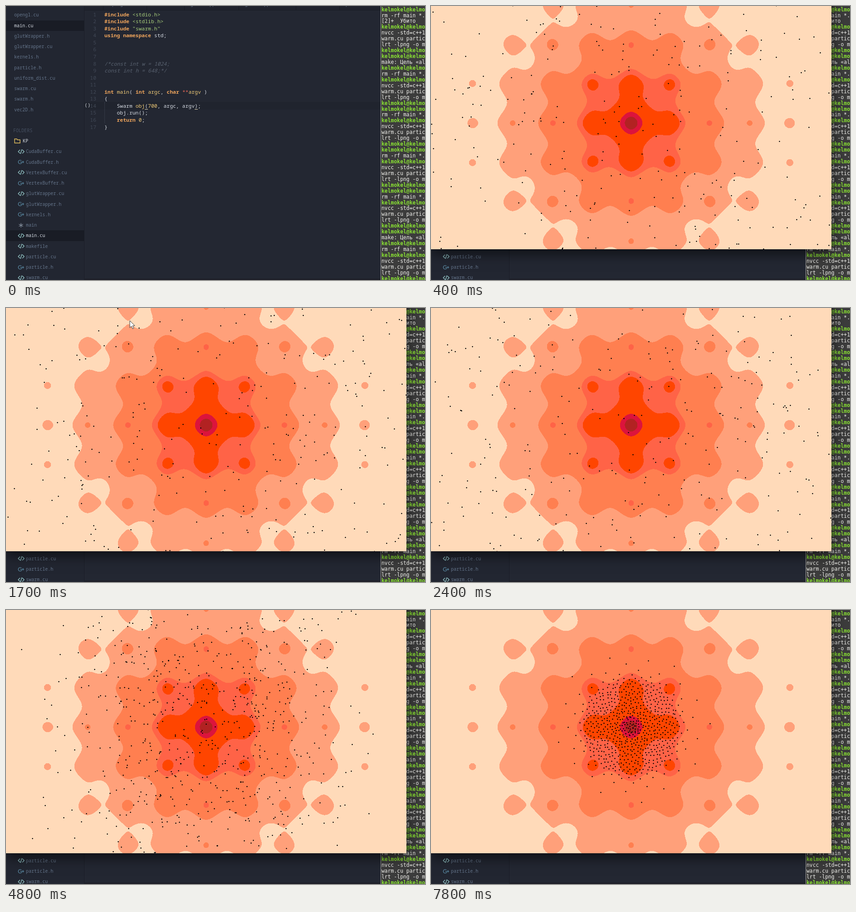
These frames come from a looping animation (924x606 px, 8000 ms). An HTML page with a canvas:

```html
<!DOCTYPE html>
<html lang="en">
<head>
<meta charset="utf-8">
<title>Particle swarm</title>
<style>
html, body { margin: 0; width: 100%; height: 100%; overflow: hidden; background: #232732; }
#stage { position: relative; width: 924px; height: 606px; overflow: hidden; background: #232732; }
#stage div, #stage svg, #stage canvas, #stage pre { position: absolute; margin: 0; white-space: pre; }
#side { left: 0; top: 0; width: 172px; height: 606px; background: #222631; border-right: 1px solid #1b1e27;
  overflow: hidden; font: 10.05px/23.25px "Roboto Mono", "Noto Sans Mono", monospace; color: #64748a; }
#side .row { left: 0; width: 172px; height: 23.25px; }
#side .on { background: #191c25; color: #d5dae2; }
#tabs { left: 173px; top: 0; width: 653px; height: 9px; background: #20232d; border-bottom: 1px solid #1b1e27;
  overflow: hidden; font: 10px/14px "Noto Sans Mono", monospace; color: #64748a; }
#tabs div { top: -12px; height: 22px; border-left: 1px solid #181b23; padding-left: 13px; }
#code, #nums { top: 10.6px; font: 11.45px/15.56px "Roboto Mono", "Noto Sans Mono", monospace; }
#code { left: 217px; color: #d5dae2; }
#nums { left: 173px; width: 26px; text-align: right; color: #414856; }
#code b { color: #eea45c; }
#code .g { color: #a9cf7b; }
#code .y { color: #f0cb78; }
#code .r { color: #ec6a58; }
#code i { color: #596270; }
#code u { text-decoration: none; box-shadow: 0 1px #e8dcb8; }
#term { left: 826px; top: 0; width: 97px; height: 606px; background: #3c3c3c; border-left: 1px solid #9b9b9b; overflow: hidden; }
#term pre { left: 1px; top: 1.6px; font: 11.4px/12.93px "DejaVu Sans Mono", monospace; color: #f4f4f0; }
#term b { color: #8ae234; }
</style>
</head>
<body>
<div id="stage">
  <div id="side"></div>
  <div id="tabs"></div>
  <div style="left:173px;top:212px;width:653px;height:17px;background:#20242e"></div>
  <div style="left:217px;top:213px;height:46px;border-left:1px dotted #454b58"></div>
  <pre id="nums"></pre>
  <div style="left:173px;top:211px;font:11.45px/16px 'Noto Sans Mono',monospace;color:#c3c8cf">()</div>
  <pre id="code"><b>#include</b> <span class="g">&lt;stdio.h&gt;</span>
<b>#include</b> <span class="g">&lt;stdlib.h&gt;</span>
<b>#include</b> <span class="g">"swarm.h"</span>
<b>using namespace</b> std;



<i>/*const int w = 1024;</i>
<i>const int h = 648;*/</i>


<b>int</b> <span class="y">main</span>( <b>int</b> <span class="y">argc</span>, <b>char</b> <span class="r">**</span><span class="y">argv</span> )
{
    Swarm <span class="y">obj</span><u>(</u><span class="y">700</span>, argc, argv<u>)</u>;
    obj.run();
    <b>return</b> <span class="y">0</span>;
}</pre>
  <div style="left:173px;top:603px;width:653px;height:3px;background:#1d1f28"></div>
  <div id="term"><pre></pre></div>
  <canvas id="view" width="924" height="606" style="left:0;top:0"></canvas>
</div>
<script>
const $ = s => document.querySelector(s);

// Editor sidebar, tabs and terminal
const icons = {
  code: '<path d="M5 2 1 6l4 4M10 2l4 4-4 4M9 1 6 11" stroke="#8fbfc0" stroke-width="1.5"/>',
  head: '<path d="M8 3.2A4 4 0 1 0 8 8.8V6H5.5M9 6h5M11.5 3.5v5" stroke="#5f92ad" stroke-width="1.2"/>',
  star: '<path d="M7 1v10M2.5 3.5l9 5M11.5 3.5l-9 5" stroke="#8a95a3" stroke-width="1.2"/>',
  folder: '<path d="M1 2h5l1 2h6v7H1z" stroke="#e5c15f" stroke-width="1.4"/>'
};
const icon = (kind, x) =>
  `<svg style="left:${x}px;top:5.5px" width="15" height="12" fill="none">${icons[kind]}</svg>`;
const row = (y, x, name, on, pic = '') =>
  `<div class="row ${on ? 'on' : ''}" style="top:${y - 11.6}px">${pic}<div style="left:${x}px">${name}</div></div>`;
const kind = f => f.endsWith('.h') ? 'head' : f === 'main' ? 'star' : 'code';

const open = 'opengl.cu main.cu glutWrapper.h glutWrapper.cu kernels.h particle.h uniform_dist.cu swarm.cu swarm.h vec2D.h'.split(' ');
const files = 'CudaBuffer.cu CudaBuffer.h VertexBuffer.cu VertexBuffer.h glutWrapper.cu glutWrapper.h kernels.h main main.cu makefile particle.cu particle.h swarm.cu'.split(' ');
$('#side').innerHTML =
  open.map((f, i) => row(20 + i * 23.25, 18, f, f === 'main.cu')).join('') +
  '<div style="left:16px;top:264px;color:#465062">FOLDERS</div>' +
  row(298.5, 37, '<span style="color:#d5dae2">KP</span>', false, icon('folder', 18)) +
  files.map((f, i) => row(322 + i * 23.25, 44, f, f === 'main.cu', icon(kind(f), 26))).join('');

$('#tabs').innerHTML = [[214, 'opengl.cu'], [310, ''], [393, 'glutWrapper.h'], [513, 'glutWrapper.cu'], [639, ''], [735, 'particle.h']]
  .map(([x, name]) => `<div style="left:${x - 173}px">${name}</div>`).join('');
$('#nums').textContent = Array.from({ length: 17 }, (_, i) => i + 1).join('\n');

const lines = {
  u: '<b>kelmokel@kelmo</b>', r: 'rm -rf main *.', k: '[2]+  Убито', n: 'nvcc -std=c++1',
  w: 'warm.cu partic', l: 'lrt -lpng -o m', m: 'make: Цель «al'
};
$('#term pre').innerHTML = [...'urkunwluumurunwluurunwluurunwluurunwluumurunwlu'].map(c => lines[c]).join('\n');

// Swarm window: Ackley function in colour bands, x in [-5, 5]
const N = 700, W = 883, H = 583, TOP = -45, TITLE = -21;
const CX = 441.4, CY = 258.9, UNIT = 88.2, MID = 247;
const bands = [
  [1, 178, 34, 34], [2, 220, 20, 60], [4, 255, 69, 0], [5, 255, 99, 71],
  [7, 255, 127, 80], [9, 255, 160, 122], [99, 255, 218, 185]
];
const cos2 = v => Math.cos(2 * Math.PI * v);
const ackley = (x, y) => 20 + Math.E - 20 * Math.exp(-0.2 * Math.sqrt((x * x + y * y) / 2))
  - Math.exp((cos2(x) + cos2(y)) / 2);

function makeCanvas() {
  const c = document.createElement('canvas');
  c.width = W;
  c.height = H;
  return c;
}

const field = makeCanvas(), win = makeCanvas();
{
  const g = field.getContext('2d'), img = g.createImageData(W, H);
  for (let y = 0, p = 0; y < H; y++) {
    for (let x = 0; x < W; x++, p += 4) {
      const f = ackley((x + 0.5 - CX) / UNIT, (y + TOP + 0.5 - CY) / UNIT);
      const c = y + TOP < TITLE ? [0, 190, 190, 190] : bands.find(b => f < b[0]);
      img.data.set([c[1], c[2], c[3], 255], p);
    }
  }
  g.putImageData(img, 0, 0);
}

let seed = 20177;
function rand() {
  seed = seed + 0x6D2B79F5 | 0;
  let t = Math.imul(seed ^ seed >>> 15, 1 | seed);
  t = t + Math.imul(t ^ t >>> 7, 61 | t) ^ t;
  return ((t ^ t >>> 14) >>> 0) / 4294967296;
}
const sym = r => (rand() * 2 - 1) * r;

const REACH = 620;
const swarm = Array.from({ length: N }, (_, i) => {
  const u = (i + 0.5) / N, a = i * 2.39996;
  const r = 115 * u ** 0.6 + 60 * u ** 30;
  return {
    x: sym(REACH), y: sym(REACH), vx: sym(30), vy: sym(30), w: 0.6 + rand() * 0.9,
    qx: r * Math.cos(a) + sym(2), qy: r * Math.sin(a) + sym(2)
  };
});
const wrap = v => ((v + REACH) % (2 * REACH) + 2 * REACH) % (2 * REACH) - REACH;

// [start time, spread] while the swarm closes in
const pulls = [
  [3700, 0.85], [3800, 0.8], [4400, 0.457], [4800, 0.41], [5200, 0.35], [5600, 0.295], [6000, 0.24],
  [6400, 0.185], [6800, 0.135], [7100, 0.09], [7500, 0.04], [7800, 0]
];

function drawWindow(t) {
  const g = win.getContext('2d');
  const step = t < 3700 ? Math.min(24, Math.floor(t / 100)) : t < 3800 ? 25 : 26;
  const spread = pulls.reduce((d, [at, v]) => t >= at ? v : d, 0.95);
  g.drawImage(field, 0, 0);
  g.fillStyle = '#000';
  for (const p of swarm) {
    const d = Math.min(1, spread * p.w), k = spread * p.w;
    const x = Math.round(CX + p.qx * (1 - d) + wrap(p.x + p.vx * step) * k);
    const y = Math.round(CY + p.qy * (1 - d) + wrap(p.y + p.vy * step) * k);
    if (y < TITLE + 2) continue;
    g.fillRect(x - 1, y - TOP, 3, 1);
    g.fillRect(x, y - TOP - 1, 1, 3);
  }
}

// Opening strips: [top, bottom, scale, opacity]
const full = [[0, 606, 1, 1]];
function strips(t) {
  if (t < 200) return [[0, 606, 0.7, 0.7]];
  if (t < 300) return [[0, 155, 0.909, 0.9], [155, 259, 0.932, 0.93], [259, 414, 0.946, 0.95], [414, 606, 0.958, 0.97]];
  return full;
}

const view = $('#view').getContext('2d');

function paintStrip([top, bottom, s, alpha]) {
  view.save();
  view.beginPath();
  view.rect(0, top, 924, bottom - top);
  view.clip();
  view.globalAlpha = alpha;
  const x = 441.5 - 441.5 * s, y = MID + (TOP - MID) * s;
  view.save();
  view.shadowColor = 'rgba(0,0,0,.65)';
  view.shadowBlur = 28;
  view.shadowOffsetX = 2000;
  view.shadowOffsetY = 8;
  view.fillRect(x - 2000, y, W * s, H * s);
  view.restore();
  view.drawImage(win, x, y, W * s, H * s);
  view.restore();
}

const arrow = new Path2D('M0 0V15.5L3.6 12.2 6.2 18 8.8 16.8 6.2 11.2H11Z');
function paintCursor(t) {
  if (t < 1200 || t >= 1900) return;
  const u = (Math.floor(t / 100) * 100 - 1200) / 500;
  view.save();
  view.translate(248 + 25 * u, 545 - 517 * u);
  view.fillStyle = '#fff';
  view.strokeStyle = '#333';
  view.fill(arrow);
  view.stroke(arrow);
  view.restore();
}

function frame() {
  const t = performance.now() % 8000;
  view.clearRect(0, 0, 924, 606);
  if (t >= 100) {
    drawWindow(t);
    strips(t).forEach(paintStrip);
    paintCursor(t);
  }
  requestAnimationFrame(frame);
}
frame();
</script>
</body>
</html>
```
